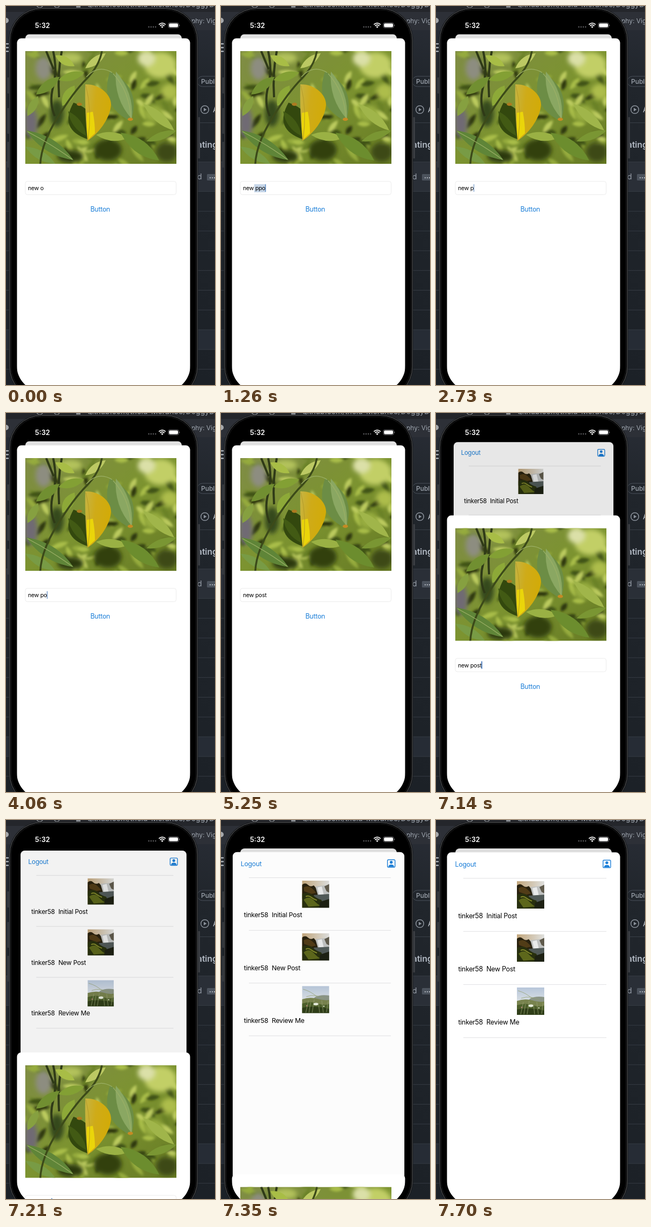
Animation of 390 by 706 pixels, one loop 8 s. Source, as an HTML page:

```html
<!DOCTYPE html>
<html lang="en">
<head>
<meta charset="utf-8">
<title>New post</title>
<style>
html, body { margin: 0; width: 100%; height: 100%; overflow: hidden; background: #1f242a; }
svg { display: block; width: 390px; height: 706px; }
text { font-family: Inter, Roboto, "Liberation Sans", sans-serif; }
.body { font-size: 12.4px; letter-spacing: -.25px; }
.field { font-size: 10.6px; letter-spacing: -.22px; }
.link { fill: #1c7fd8; }
.web { fill: #9ea5ae; }
</style>
</head>
<body>
<svg viewBox="0 0 390 706">
  <defs>
    <linearGradient id="page" x1="0" y1="0" x2="0" y2="1">
      <stop offset="0" stop-color="#2a2e37"/>
      <stop offset=".2" stop-color="#21262c"/>
      <stop offset="1" stop-color="#1c2127"/>
    </linearGradient>
    <linearGradient id="foliage" x1="0" y1="0" x2="1" y2="1">
      <stop offset="0" stop-color="#7f8c45"/>
      <stop offset=".5" stop-color="#7c9330"/>
      <stop offset="1" stop-color="#667a24"/>
    </linearGradient>
    <linearGradient id="gold" x1="0" y1="0" x2="1" y2=".25">
      <stop offset="0" stop-color="#c6b444"/>
      <stop offset=".45" stop-color="#cfab18"/>
      <stop offset="1" stop-color="#d2ab08"/>
    </linearGradient>
    <linearGradient id="dusk" x1="0" y1="0" x2="1" y2="0">
      <stop offset="0" stop-color="#c2a67c"/>
      <stop offset="1" stop-color="#dfe0de"/>
    </linearGradient>
    <linearGradient id="haze" x1="0" y1="0" x2="0" y2="1">
      <stop offset="0" stop-color="#b7c6da"/>
      <stop offset=".6" stop-color="#dfe4e6"/>
    </linearGradient>
    <filter id="soft"><feGaussianBlur stdDeviation="4"/></filter>
    <filter id="mid"><feGaussianBlur stdDeviation="2"/></filter>
    <filter id="fine"><feGaussianBlur stdDeviation=".7"/></filter>
    <clipPath id="screen"><rect x="20" y="14" width="324" height="704" rx="48"/></clipPath>
    <clipPath id="photoBox"><rect x="36" y="84" width="282" height="210"/></clipPath>
    <clipPath id="thumbBox"><rect width="51" height="51"/></clipPath>

    <g id="falls" clip-path="url(#thumbBox)">
      <rect width="51" height="51" fill="url(#dusk)"/>
      <g filter="url(#fine)">
        <path d="M0 8 Q6 3 11 8 T22 9 L29 17 L35 34 H0Z" fill="#28210f"/>
        <path d="M3 13 Q11 8 18 14 T26 23 L18 25 L4 20Z" fill="#513c17"/>
        <path d="M25 11 L52 8 V28 H30Z" fill="#bfc1c0"/>
        <path d="M29 13 L37 11 L41 27 H32Z" fill="#e9eaea"/>
        <path d="M42 11 L52 6 V23 L46 20Z" fill="#5f5a4c"/>
        <path d="M22 27 L52 25 V52 H24Z" fill="#515a58"/>
        <path d="M0 25 Q12 20 20 27 T36 36 L44 52 H0Z" fill="#28300e"/>
        <path d="M3 36 Q13 27 22 37 T36 47 L12 49Z" fill="#5d671b"/>
        <path d="M7 30 Q12 27 17 31 T28 37" fill="none" stroke="#848a2b" stroke-width="2"/>
        <path d="M34 40 L52 34 V52 H32Z" fill="#1d2113"/>
      </g>
    </g>

    <g id="meadow" clip-path="url(#thumbBox)">
      <rect width="51" height="51" fill="url(#haze)"/>
      <g filter="url(#fine)">
        <path d="M24 21 Q35 15 52 18 V31 H18Z" fill="#8b9586"/>
        <path d="M0 25 Q15 20 29 24 T52 26 V52 H0Z" fill="#78834e"/>
        <path d="M0 33 Q17 28 30 33 T52 33 V52 H0Z" fill="#4d5f2b"/>
        <path d="M0 41 Q20 36 52 43 V52 H0Z" fill="#2f3e18"/>
        <path d="M2 6Q17 10 29 21M8 20Q26 14 42 24M7 50L12 27M13 50L16 31M19 50L23 25M33 50L31 32M40 50L37 27M46 49L49 29" fill="none" stroke="#96a173" stroke-width=".8"/>
        <ellipse cx="26" cy="34" rx="4.5" ry="2.4" fill="#e7ecdc"/>
        <circle cx="9" cy="37" r="1.3" fill="#b9847c"/>
        <circle cx="41" cy="38" r="1.2" fill="#d9dfc8"/>
      </g>
    </g>
  </defs>

  <!-- web page behind the phone -->
  <rect width="390" height="706" fill="url(#page)"/>
  <rect width="390" height="11" fill="#24262b"/>
  <rect y="11" width="390" height="34" fill="#2d3037"/>
  <g fill="none" stroke="#888c91" stroke-width="1.5">
    <circle cx="63" cy="-3" r="6"/><circle cx="95" cy="-2" r="5"/>
  </g>
  <rect x="131" y="-4" width="8" height="7" fill="#888c91"/>
  <text class="web" x="152" y="1.5" font-size="14">github.com/tfield-Moran38/DoggyDates</text>
  <circle cx="0" cy="27" r="5" fill="#a6a8ab"/>
  <text class="web" x="346" y="32" font-size="12">phy: Vig</text>
  <path d="M0 70.5H5M0 77.5H5M0 84.5H5" stroke="#c3c9d0" stroke-width="2"/>
  <rect x="357" y="131" width="60" height="19" rx="9.5" fill="none" stroke="#4a515b"/>
  <text class="web" x="364" y="145" font-size="12" font-weight="500">Public</text>
  <circle cx="371" cy="193" r="7.3" fill="none" stroke="#8b929b" stroke-width="1.5"/>
  <path d="M369 189.7 L374.5 193 L369 196.3Z" fill="#8b929b"/>
  <text x="386" y="198" font-size="14" fill="#c3c9d0">Actions</text>
  <path d="M340 217.5H390" stroke="#3a4048"/>
  <text x="357" y="264" font-size="15.5" font-weight="600" fill="#b5bdc7">ating</text>
  <rect y="290" width="390" height="55" fill="#2a2f37"/>
  <text class="web" x="357" y="323" font-size="14">d</text>
  <rect x="375" y="313" width="24" height="12" rx="1.5" fill="#4b525c"/>
  <g fill="#c3c9d0"><circle cx="381" cy="320" r="1.1"/><circle cx="385" cy="320" r="1.1"/><circle cx="389" cy="320" r="1.1"/></g>
  <rect y="603" width="390" height="37" fill="#262c35"/>
  <g id="rows" stroke="#353b43"></g>

  <!-- phone -->
  <g fill="#3b3e43">
    <rect x="2.5" y="133" width="4" height="30" rx="1"/>
    <rect x="2.5" y="190" width="4" height="48" rx="1"/>
    <rect x="2.5" y="253" width="4" height="48" rx="1"/>
    <rect x="358" y="207" width="4" height="77" rx="1"/>
  </g>
  <rect x="5.5" y="3" width="353" height="730" rx="61" fill="#17181a"/>
  <rect x="7" y="4.5" width="350" height="727" rx="59.5" fill="#000" stroke="#5c5e61"/>
  <rect x="9.5" y="7" width="345" height="722" rx="57" fill="none" stroke="#1e1f21"/>

  <!-- status bar -->
  <text x="54" y="40.5" font-size="12.8" font-weight="600" fill="#fff">5:32</text>
  <g fill="#5c5c5e">
    <circle cx="266.5" cy="39" r="1.3"/><circle cx="270.7" cy="39" r="1.3"/>
    <circle cx="274.9" cy="39" r="1.3"/><circle cx="279.1" cy="39" r="1.3"/>
  </g>
  <g fill="none" stroke="#fff" stroke-width="1.8">
    <path d="M285.2 34.6Q291.5 29.2 297.8 34.6M287.4 37Q291.5 33.6 295.6 37"/>
  </g>
  <path d="M289.2 38.6Q291.5 36.8 293.8 38.6L291.5 41Z" fill="#fff"/>
  <rect x="302.9" y="31.2" width="19.4" height="9.6" rx="3" fill="none" stroke="#77777a" stroke-width=".9"/>
  <rect x="304.2" y="32.5" width="16.8" height="7" rx="1.9" fill="#fff"/>
  <path d="M323.4 34.4Q325.4 36 323.4 37.6Z" fill="#8d8d90"/>

  <g clip-path="url(#screen)">
    <rect id="base" x="36" y="53" width="292" height="60" rx="8" fill="#dfdfdf"/>

    <g id="feed">
      <rect x="20.5" y="60.3" width="323" height="740" rx="8" fill="#fff"/>
      <text class="body link" x="35.5" y="86.5">Logout</text>
      <rect x="311.7" y="74.7" width="14.2" height="14.2" rx="2" fill="none" stroke="#1c7fd8" stroke-width="1.4"/>
      <circle cx="318.8" cy="79.6" r="2.7" fill="#1c7fd8"/>
      <path d="M313.4 88.2Q313.8 83.8 318.8 83.8T324.2 88.2Z" fill="#1c7fd8"/>
      <g id="posts"></g>
      <rect id="dim" x="20.5" y="60.3" width="323" height="740" rx="8"/>
    </g>

    <g id="sheet">
      <rect x="20.5" y="60.3" width="323" height="740" rx="8" fill="#fff"/>
      <g id="photo" clip-path="url(#photoBox)"></g>
      <rect x="36" y="326.5" width="281.5" height="25" rx="4" fill="#fff" stroke="#ececec"/>
      <rect id="mark" x="62" y="332" height="15" fill="#c6d6e8"/>
      <text id="entry" class="field" x="41" y="343"></text>
      <rect id="caret" y="332" width="1.6" height="14" fill="#2f69b3"/>
      <text class="body link" x="157.5" y="383">Button</text>
    </g>
  </g>
</svg>

<script>
const $ = id => document.getElementById(id);
const LOOP = 8000, TICK = 70, DISMISS = 7140, SETTLED = 7700;

// time, typed word, caret opacity, highlight opacity
const STEPS = [
  [0, "o", 0, 0], [70, "", 1, 0], [420, "p", 1, 0], [630, "ppo", 1, 0],
  [910, "ppo", 1, 1], [1260, "ppo", .6, 1], [1330, "ppo", .3, 1], [1400, "ppo", 0, 1],
  [1610, "pp", 1, .6], [1680, "pp", 1, .35], [1750, "pp", 1, .15], [1820, "pp", 1, 0],
  [2310, "pp", .6, 0], [2380, "pp", .3, 0], [2450, "pp", 0, 0],
  [2730, "p", .5, 0], [2800, "p", 1, 0], [3360, "po", 1, 0],
  [4060, "po", .6, 0], [4130, "po", 0, 0],
  [4410, "pos", 1, 0], [4480, "post", 1, 0],
  [5110, "post", .6, 0], [5180, "post", .3, 0], [5250, "post", 0, 0],
  [5530, "post", .5, 0], [5600, "post", 1, 0],
  [6160, "post", .6, 0], [6230, "post", .3, 0], [6300, "post", 0, 0],
  [6580, "post", .5, 0], [6650, "post", 1, 0]
];

function drawRows() {
  let out = '<path d="M0 290.5H390"/>';
  for (let y = 345.5; y < 706; y += 36.8) out += `<path d="M0 ${y}H390"/>`;
  $("rows").innerHTML = out;
}

function drawPosts() {
  const posts = [["Initial Post", "falls"], ["New Post", "falls"], ["Review Me", "meadow"]];
  const line = y => `<path d="M51 ${y}H318" stroke="#e2e2e4"/>`;
  $("posts").innerHTML = posts.map(([title, pic], i) => {
    const y = 108.5 + i * 99;
    return `${line(y)}<use href="#${pic}" x="151" y="${y + 5.5}"/>
      <text class="body" x="41.5" y="${y + 74.5}">tinker58</text>
      <text class="body" x="94" y="${y + 74.5}">${title}</text>`;
  }).join("") + line(405.5);
}

// Lens-shaped leaf between two points
function leaf(x1, y1, x2, y2, width, color) {
  const len = Math.hypot(x2 - x1, y2 - y1);
  const nx = (y1 - y2) / len * width, ny = (x2 - x1) / len * width;
  const mx = (x1 + x2) / 2, my = (y1 + y2) / 2;
  return `<path d="M${x1} ${y1}Q${mx + nx} ${my + ny} ${x2} ${y2}Q${mx - nx} ${my - ny} ${x1} ${y1}" fill="${color}"/>`;
}

const blob = (x, y, rx, ry, color) =>
  `<ellipse cx="${x}" cy="${y}" rx="${rx}" ry="${ry}" fill="${color}"/>`;

function drawPhoto() {
  let seed = 11;
  const rand = () => (seed = seed * 16807 % 2147483647) / 2147483647;
  const greens = ["#95ab3c", "#3f5316", "#bccb5e", "#6a8227", "#2d390f", "#a9bd48"];
  let texture = "";
  for (let i = 0; i < 84; i++) {
    const x = 36 + rand() * 282, y = 84 + rand() * 210, a = rand() * 6.28, r = 18 + rand() * 24;
    texture += leaf(x, y, x + Math.cos(a) * r, y + Math.sin(a) * r, 10, greens[i % 6]);
  }
  const glow = [
    [70, 116, 15, 22, "#8d8d80"], [46, 218, 13, 28, "#706b73"], [120, 97, 22, 10, "#b3c25c"],
    [288, 110, 30, 24, "#c2cf66"], [262, 98, 16, 14, "#dbe0a8"], [305, 160, 16, 15, "#adbd4c"],
    [275, 200, 18, 16, "#98ad40"], [190, 268, 26, 20, "#323f10"], [95, 200, 13, 25, "#35481a"],
    [300, 272, 20, 18, "#3c4a18"], [120, 280, 24, 12, "#2c390d"]
  ].map(b => blob(...b)).join("");

  const leaves = [
    [92, 92, 128, 112, 15, "#a8bd46"], [186, 88, 148, 116, 14, "#bcc963"],
    [146, 124, 98, 138, 16, "#83a034"], [128, 148, 105, 186, 19, "#8da938"],
    [100, 132, 56, 165, 18, "#718f31"], [60, 168, 40, 205, 15, "#86a040"],
    [126, 180, 152, 248, 44, "#33480e"], [116, 196, 150, 242, 15, "#425a14"],
    [194, 122, 233, 215, -44, "#6c8d45"], [205, 122, 235, 211, -20, "#8aa762"],
    [38, 232, 126, 287, 23, "#5f8538"], [36, 262, 92, 294, 16, "#789b45"],
    [168, 240, 228, 246, 16, "#9ab144"], [214, 236, 286, 288, 24, "#6c8d2e"],
    [256, 182, 314, 232, 18, "#a0b54a"], [318, 232, 262, 252, 14, "#7a9633"]
  ].map(l => leaf(...l)).join("");

  $("photo").innerHTML = `
    <rect x="36" y="84" width="282" height="210" fill="url(#foliage)"/>
    <g filter="url(#mid)">${texture}</g>
    <g filter="url(#soft)">${glow}</g>
    <g filter="url(#fine)">
      <path d="M88 84Q96 120 88 150T91 205M104 84Q96 125 99 170M75 84L89 118" fill="none" stroke="#2f3a17" stroke-width="4"/>
      ${leaves}
      <path d="M179 84Q174 112 150 136T96 208T64 294" fill="none" stroke="#3c4a19" stroke-width="3.5"/>
      <path d="M150 132Q172 108 198 124M40 234Q86 258 124 286M200 126Q231 160 233 210" fill="none" stroke="#9cb066" stroke-width="1.2"/>
      ${blob(232, 211, 5, 3, "#c68a24")}${blob(137, 183, 5, 3, "#ad7a20")}
      <path d="M148 146C174 145 196 164 196 184C194 211 171 239 152 251C149 219 147 181 148 146Z" fill="url(#gold)"/>
      <path d="M151 199L162 197Q166 218 166 237L153 249Q150 225 151 199Z" fill="#ead50a"/>
      <path d="M149 148Q161 194 153 250" fill="none" stroke="#b59b29" stroke-width="1"/>
    </g>`;
}

// Critically damped spring already under way when the first change shows
function dismissal(t) {
  if (t < DISMISS) return 0;
  if (t >= SETTLED) return 1;
  const x = (t - 7087) * .0155;
  return 1 - (1 + x) * Math.exp(-x);
}

function render(time) {
  const t = Math.floor(time / TICK) * TICK;
  const [, word, caret, mark] = STEPS.findLast(s => s[0] <= t);
  const entry = $("entry");
  entry.textContent = "new\u00a0" + word;
  const end = 41 + entry.getComputedTextLength();
  $("caret").setAttribute("x", end - .4);
  $("caret").setAttribute("opacity", caret);
  $("mark").setAttribute("width", Math.max(0, end + 1 - 62));
  $("mark").setAttribute("opacity", mark);

  const p = dismissal(t);
  const scale = (292 + 31 * p) / 323;
  $("sheet").setAttribute("transform", `translate(0 ${656 * p})`);
  $("feed").setAttribute("transform", `translate(182 ${52.8 + 7.5 * p}) scale(${scale}) translate(-182 -60.3)`);
  $("dim").setAttribute("opacity", .116 * (1 - p));
  const rise = Math.min(1, Math.max(0, (p - .58) / .3));
  $("base").setAttribute("y", 62 - 9 * rise);
}

drawRows();
drawPosts();
drawPhoto();

const start = performance.now();
function frame() {
  render((performance.now() - start) % LOOP);
  requestAnimationFrame(frame);
}
frame();
</script>
</body>
</html>
```
